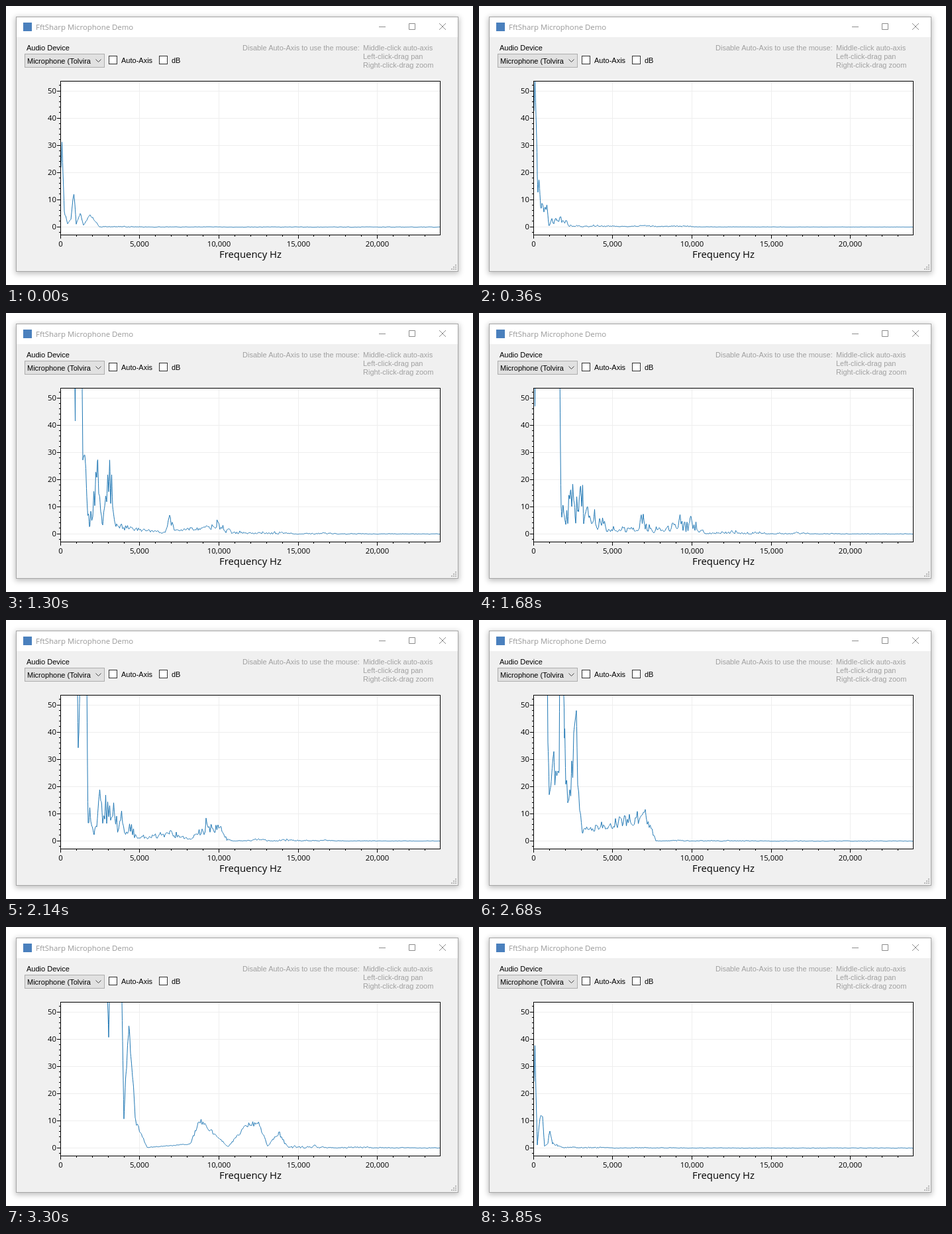
Write an HTML page that moves like this. It is 705 by 421 pixels and loops after 3.92 s.

```html
<!DOCTYPE html>
<html lang="en">
<head>
<meta charset="utf-8">
<title>FftSharp Microphone Demo</title>
<style>
html, body { margin: 0; width: 100%; height: 100%; overflow: hidden; background: #fff; }
.win { position: absolute; left: 15px; top: 16px; width: 668px; height: 385px; box-shadow: 0 2px 8px 1px rgba(0,0,0,.26); }
svg { position: absolute; left: 0; top: 0; }
text { white-space: pre; }
.form { font: 11px "Liberation Sans", Arial, sans-serif; }
.ui { font: 11.4px "Open Sans", "Noto Sans", sans-serif; }
.axis { font: 14.9px "Open Sans", "Noto Sans", sans-serif; }
.dim { fill: #a0a0a0; }
</style>
</head>
<body>
<div class="win"></div>
<svg width="705" height="421" viewBox="0 0 705 421">
  <defs><clipPath id="area"><rect x="82" y="114" width="573" height="231"/></clipPath></defs>
  <rect x="15.5" y="16.5" width="667" height="384" fill="#f0f0f0" stroke="#a6a6a6"/>
  <rect x="16" y="17" width="666" height="30" fill="#fff"/>
  <rect x="26" y="25" width="13" height="13" fill="#4a80bd"/>
  <text class="ui" x="45" y="36" fill="#999">FftSharp Microphone Demo</text>
  <path d="M563 31.5h10M608.5 26.5h9v9h-9zM654 26l10 10M664 26l-10 10" fill="none" stroke="#8c8c8c"/>

  <g class="form">
    <text x="31" y="67">Audio Device</text>
    <rect x="28.5" y="72.5" width="120" height="20" fill="#e1e1e1" stroke="#adadad"/>
    <text x="32" y="87">Microphone (Tolvira</text>
    <path d="M135.5 80.5l4 4 4-4" fill="none" stroke="#444"/>
    <rect x="155.5" y="75.5" width="12" height="12" fill="#fff" stroke="#333"/>
    <text x="174" y="86">Auto-Axis</text>
    <rect x="231.5" y="75.5" width="12" height="12" fill="#fff" stroke="#333"/>
    <text x="250" y="86">dB</text>
    <g class="dim">
      <text x="357" y="67">Disable Auto-Axis to use the mouse:</text>
      <text x="539" y="67">Middle-click auto-axis</text>
      <text x="539" y="80">Left-click-drag pan</text>
      <text x="539" y="93">Right-click-drag zoom</text>
    </g>
  </g>

  <rect x="82" y="113" width="574" height="233" fill="#fff"/>
  <path id="grid" stroke="#eee"/>
  <path id="curve" clip-path="url(#area)" fill="none" stroke="#1f77b4" stroke-linejoin="bevel"/>
  <rect x="82.5" y="113.5" width="573" height="232" fill="none" stroke="#000"/>
  <path id="ticks" stroke="#000"/>
  <g id="labels" class="ui"></g>
  <text class="axis" x="369" y="380" text-anchor="middle">Frequency Hz</text>
  <path id="grip" fill="#b8b8b8"/>
</svg>
<script>
const LOOP = 3920, LEFT = 83, RIGHT = 655, ZERO = 333.6, STEP = 0.5, TOP = 600;
const COUNT = (RIGHT - LEFT) / STEP + 1;
const $ = id => document.getElementById(id);

function drawAxes() {
  let grid = '', ticks = '', labels = '', grip = '';
  const snap = v => Math.floor(v) + 0.5;
  for (let v = -2; v <= 52; v += 2) {
    const y = snap(333 - v * 4.1), major = v % 10 === 0;
    ticks += `M82 ${y}h${major ? -5 : -2}`;
    if (!major) continue;
    grid += `M83 ${y}H655`;
    labels += `<text x="76" y="${y + 3.5}" text-anchor="end">${v}</text>`;
  }
  for (let k = 0; k < 24; k++) {
    const x = snap(82.4 + k * 23.91), major = k % 5 === 0;
    ticks += `M${x} 346v${major ? 5 : 2}`;
    if (!major) continue;
    if (k) grid += `M${x} 114V345`;
    labels += `<text x="${x}" y="363" text-anchor="middle">${k ? k + ',000' : 0}</text>`;
  }
  for (let r = 0; r < 3; r++)
    for (let c = 0; c <= r; c++) grip += `M${678 - 3 * c} ${390 + 3 * r}h2v2h-2z`;
  $('grid').setAttribute('d', grid);
  $('ticks').setAttribute('d', ticks);
  $('labels').innerHTML = labels;
  $('grip').setAttribute('d', grip);
}

function rand(i, seed) {
  let n = Math.imul(i + 1, 374761393) ^ Math.imul(seed + 7, 668265263);
  n = Math.imul(n ^ (n >>> 13), 1274126177);
  return ((n ^ (n >>> 16)) >>> 0) / 4294967296;
}

// Random values every `gap` samples, joined by straight lines.
function noise(i, gap, seed) {
  const k = Math.floor(i / gap), f = i / gap - k;
  return rand(k, seed) * (1 - f) + rand(k + 1, seed) * f;
}

// Straight-line lookup in a flat list of x, y pairs.
function along(list, x) {
  if (x <= list[0]) return list[1];
  for (let j = 2; j < list.length; j += 2)
    if (x <= list[j]) {
      const f = (x - list[j - 2]) / (list[j] - list[j - 2]);
      return list[j - 1] + f * (list[j + 1] - list[j - 1]);
    }
  return list[list.length - 1];
}

// A spectrum: outline of x, height pairs, its jaggedness, and the hum beyond it.
const poses = [];
function pose(at, rough, hum, ...outline) {
  const end = outline[outline.length - 2], h = [];
  for (let i = 0; i < COUNT; i++) {
    const x = LEFT + i * STEP, past = Math.max(0, x - end);
    const body = along(outline, x) * Math.max(0, 1 - past / 14);
    const rise = Math.min(1, 0.7 + (x - LEFT) * 0.2);
    const jag = 1 + rough * (2 * noise(i, 3, at) - 1);
    const rest = past && hum * Math.exp(-past / 90) * noise(i, 40, at + 3) * noise(i, 3, at + 5);
    h.push(body * rise * jag + rest + 0.8 * (noise(i, 4, at + 9) - 0.5));
  }
  poses.push({ at, h });
}

pose(0, 0.1, 2, 84.5, 128, 88, 24, 93, 5, 98, 12, 102.5, 54, 106, 4, 112, 21, 117, 3, 127, 18);
pose(9, 0.35, 4, 91, TOP, 94, 150, 101, 20, 106, 48, 113, 8, 116, 65, 119, 20, 125, 8,
  225, 3, 248, 8, 308, 5);
pose(17, 0.4, 14, 102, TOP, 104.5, 188, 106, TOP, 113, TOP, 116, 120, 126, 12, 138, 88, 145, 16,
  157, 85, 166, 12, 240, 2, 247, 24, 254, 5, 318, 11);
pose(28, 0.45, 12, 100, TOP, 109, 135, 117, TOP, 120, TOP, 124, 45, 133, 8, 144, 55, 172, 34,
  200, 4, 250, 12, 278, 3, 310, 26, 319, 26);
pose(35, 0.3, 5, 98, TOP, 106, 80, 121, 145, 123, TOP, 126, TOP, 129, 140, 134, 55, 147, 160,
  149, 85, 156, 16, 253, 38);
pose(43, 0.12, 10, 146, TOP, 155, 152, 163, TOP, 168, TOP, 178, 42, 185.5, 200, 195, 42, 213, 1,
  278, 6, 293, 42, 335, 2, 363, 34, 381, 38, 395, 3, 411, 22);
pose(50, 0.1, 6, 84.5, 158, 88, 5, 92, 47, 96, 47, 99, 3, 104, 7, 107, 28, 111, 6);

// Each run opens at a set time and is split into equal steps.
const runs = [70, 670, 1220, 1760, 2300, 2830, 3380, LOOP], starts = [0];
for (let r = 0; r < runs.length - 1; r++) {
  const n = r ? 7 : 8, gap = (runs[r + 1] - 77 - runs[r]) / (n - 1);
  for (let j = 0; j < n; j++) starts.push(Math.round((runs[r] + gap * j) / 10) * 10);
}

function heightsAt(step) {
  const next = poses.findIndex(p => p.at >= step), b = poses[next];
  if (b.at === step) return b.h;
  const a = poses[next - 1], u = (step - a.at) / (b.at - a.at);
  const wild = Math.min(1, 6 * u * (1 - u));
  const loud = Math.exp((rand(step, 5) - 0.5) * 0.7 * wild);
  return a.h.map((h, i) => {
    const mix = Math.pow(Math.max(h, 0) + 1, 1 - u) * Math.pow(Math.max(b.h[i], 0) + 1, u) - 1;
    const jag = 1 + wild * (noise(i, 3, step) + noise(i, 9, step + 60) - 1);
    return mix * loud * jag;
  });
}

let shown = -1;
function draw(time) {
  const t = time % LOOP;
  let step = starts.length - 1;
  while (starts[step] > t) step--;
  if (step === shown) return;
  shown = step;
  $('curve').setAttribute('d', 'M' + heightsAt(step)
    .map((h, i) => `${LEFT + i * STEP} ${(ZERO - h).toFixed(1)}`).join('L'));
}

function tick() {
  draw(performance.now());
  requestAnimationFrame(tick);
}

drawAxes();
tick();
</script>
</body>
</html>
```
